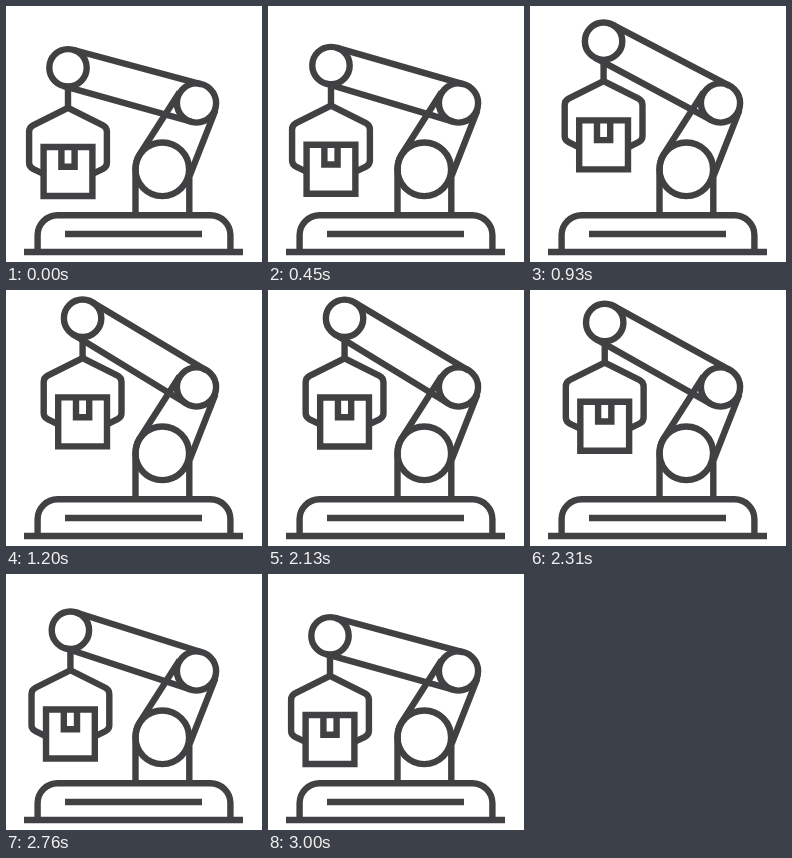
These frames come from a looping animation (256x256 px, 3600 ms). An HTML page:

```html
<!DOCTYPE html>
<html lang="en">
<head>
<meta charset="utf-8">
<title>Robot arm</title>
<style>
html, body { margin: 0; width: 100%; height: 100%; overflow: hidden; background: #fff; }
svg { display: block; width: 100%; height: 100%; }
</style>
</head>
<body>
<svg viewBox="0 0 256 256" fill="none" stroke="#414042" stroke-width="6.4">
  <!-- base -->
  <path d="M18 246H237M59 228H196M31.600 244V229A20 20 0 0 1 51.600 209.300H204.400A20 20 0 0 1 224.400 229V244"/>
  <!-- lower arm -->
  <circle cx="156.300" cy="163.300" r="26.800"/>
  <circle cx="190.500" cy="97" r="19.600"/>
  <path d="M173.500 86.200L133.600 148.500Q129.500 155 129.500 164V209M209.400 104.300L182.400 173M183.300 163V209"/>
  <!-- upper arm, lying along the x axis from the elbow -->
  <g id="arm">
    <path id="belt"/>
  </g>
  <!-- gripper and box, hanging from the arm's end -->
  <g id="grip">
    <circle r="18.700"/>
    <path d="M0 19V41"/>
    <path d="M-24.400 106.200L-35 101Q-38.900 99 -38.900 95V64Q-38.900 59.500 -35 57.500L0 40L35 57.500Q38.900 59.500 38.900 64V95Q38.900 99 35 101L24.400 106.200"/>
    <path d="M-24.400 79.200H24.400V128.200H-24.400ZM-6.600 79.200V99H6.600V79.200"/>
  </g>
</svg>
<script>
const LOOP = 3600, STEP = 30, MOVE = 900;
const ELBOW = { x: 190.5, y: 97 };
const LOW = { x: 62, y: 61.8 }, HIGH = { x: 76.6, y: 28.2 };
const arm = document.getElementById('arm');
const belt = document.getElementById('belt');
const grip = document.getElementById('grip');

function ease(t) {
  const p = Math.min(1, Math.max(0, t / MOVE));
  return (1 - Math.cos(Math.PI * p)) / 2;
}

function draw(now) {
  const t = Math.floor((now % LOOP) / STEP) * STEP;
  const lift = ease(t - 300) - ease(t - 2100);
  // the arm's end travels in a straight line
  const x = LOW.x + (HIGH.x - LOW.x) * lift;
  const y = LOW.y + (HIGH.y - LOW.y) * lift;
  const dx = ELBOW.x - x, dy = ELBOW.y - y;
  const angle = Math.atan2(dy, dx) * 180 / Math.PI;
  const end = -Math.hypot(dx, dy);
  arm.setAttribute('transform', `translate(${ELBOW.x} ${ELBOW.y}) rotate(${angle})`);
  belt.setAttribute('d', `M${end} -18.7L0 -19.4M${end} 18.7L0 19.4`);
  grip.setAttribute('transform', `translate(${x} ${y})`);
}

const start = performance.now();
function tick() {
  draw(performance.now() - start);
  requestAnimationFrame(tick);
}
tick();
</script>
</body>
</html>
```
